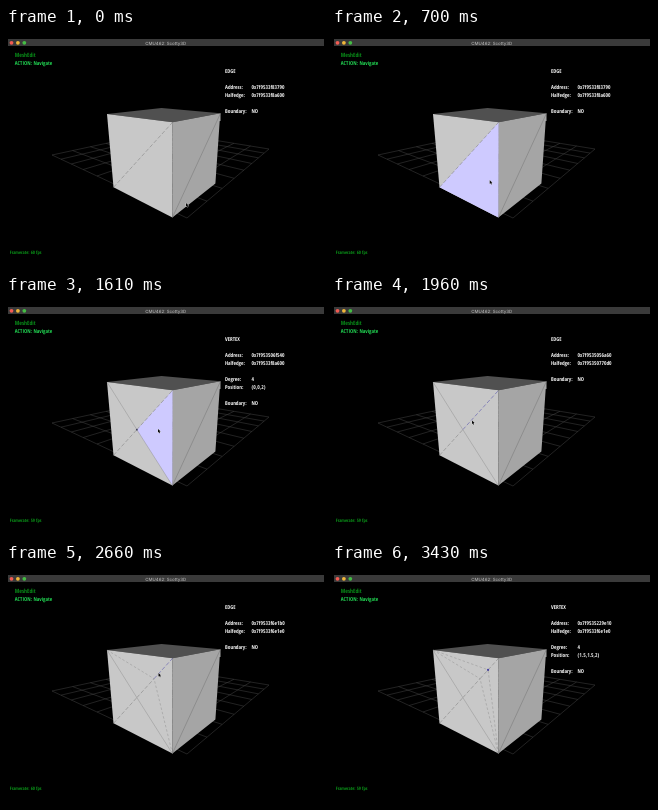
An HTML page with a canvas that plays this animation: 320 by 240 pixels, repeating every 3990 ms.

```html
<!DOCTYPE html>
<html lang="en">
<head>
<meta charset="utf-8">
<title>Mesh editing</title>
<style>
  html, body { margin: 0; width: 100%; height: 100%; overflow: hidden; background: #000; }
  canvas { display: block; }
</style>
</head>
<body>
<canvas id="stage" width="320" height="240"></canvas>
<script>
const ctx = document.getElementById('stage').getContext('2d');
const LOOP = 3990, STEP = 70;
const HUD = '"Open Sans Condensed", "Open Sans", sans-serif';

// Cube corners on screen: A, B, C, D bound the front face.
const A = [101, 86], B = [166.6, 94.3], C = [166.4, 189.6], D = [107.5, 159.3];
const E = [155.5, 80], F = [214.5, 85.3], G = [209.4, 155.5];
const NOTCH = [[214.5, 93], [213.7, 93]];

const mix = (a, b, k) => a + (b - a) * k;
const between = (p, q, k) => [mix(p[0], q[0], k), mix(p[1], q[1], k)];
const splits = [0.395, 0.686, 0.822].map(k => between(D, B, k));
const splitTimes = [1400, 2100, 2800];

// Selected element: start, kind, address, halfedge, position
const selections = [
  [0, 'EDGE', '0x7f9533f83790', '0x7f9533f8a600'],
  [1400, 'VERTEX', '0x7f953506f540', '0x7f9533f8a600', '(0,0,2)'],
  [1960, 'EDGE', '0x7f9535056a60', '0x7f95350770d0'],
  [2100, 'VERTEX', '0x7f953506f8e0', '0x7f95350770d0', '(1,1,2)'],
  [2660, 'EDGE', '0x7f9533f6e1b0', '0x7f9533f6e1e0'],
  [2800, 'VERTEX', '0x7f9535229e10', '0x7f9533f6e1e0', '(1.5,1.5,2)']
];
const rates = [[0, 60], [1050, 59], [2660, 60], [3430, 59]];

// Cursor tip: time, x, y
const route = [
  [0, 180, 175], [490, 180, 175], [560, 179.5, 175.5], [840, 136, 129],
  [1050, 136, 129], [1120, 134, 130.5], [1470, 134, 130.5], [1610, 152, 133],
  [1680, 152, 133], [1960, 140, 124.5], [2030, 140, 124.5], [2310, 157, 122],
  [2520, 152.5, 109], [2730, 152.5, 109], [3010, 161, 124],
  [3290, 156.4, 105.2], [LOOP, 156.4, 105.2]
];
const CURSOR_GONE = 3430;

const latest = (list, t) => list.filter(item => item[0] <= t).pop();

function cursorAt(t) {
  const i = route.findIndex(stop => stop[0] > t);
  const [t0, x0, y0] = route[i - 1], [t1, x1, y1] = route[i];
  const k = (t - t0) / (t1 - t0), eased = k * k * (3 - 2 * k);
  return between([x0, y0], [x1, y1], eased);
}

function distance(p, a, b) {
  const dx = b[0] - a[0], dy = b[1] - a[1];
  const k = ((p[0] - a[0]) * dx + (p[1] - a[1]) * dy) / (dx * dx + dy * dy);
  const q = between(a, b, Math.max(0, Math.min(1, k)));
  return Math.hypot(p[0] - q[0], p[1] - q[1]);
}

function trace(points) {
  ctx.beginPath();
  points.forEach(p => ctx.lineTo(...p));
}

function fill(points, color) {
  trace(points);
  ctx.closePath();
  ctx.fillStyle = color;
  ctx.fill();
}

function line(a, b, color, width = 0.5, dash = []) {
  trace([a, b]);
  ctx.setLineDash(dash);
  ctx.strokeStyle = color;
  ctx.lineWidth = width;
  ctx.stroke();
  ctx.setLineDash([]);
}

function dot(p, r, color) {
  ctx.beginPath();
  ctx.arc(...p, r, 0, 7);
  ctx.fillStyle = color;
  ctx.fill();
}

function text(str, x, y, color, size = 5.4, font = HUD, style = 'bold condensed') {
  ctx.font = `${style} ${size}px ${font}`;
  ctx.fillStyle = color;
  ctx.fillText(str, x, y);
}

// Perspective map from the unit square to a screen quad.
function projector([p0, p1, p2, p3]) {
  const ux = p1[0] - p2[0], uy = p1[1] - p2[1];
  const vx = p3[0] - p2[0], vy = p3[1] - p2[1];
  const sx = p0[0] - p1[0] + p2[0] - p3[0], sy = p0[1] - p1[1] + p2[1] - p3[1];
  const det = ux * vy - vx * uy;
  const g = (sx * vy - vx * sy) / det, h = (ux * sy - sx * uy) / det;
  return (u, v) => [0, 1].map(i =>
    (p0[i] + (p1[i] * (1 + g) - p0[i]) * u + (p3[i] * (1 + h) - p0[i]) * v) / (1 + g * u + h * v));
}
const ground = projector([[46, 127], [155, 103.5], [263, 121], [181, 190]]);

function drawGrid() {
  const n = 8;
  for (let i = 0; i <= n; i++) {
    line(ground(i / n, 0), ground(i / n, 1), '#444');
    line(ground(0, i / n), ground(1, i / n), '#444');
  }
}

function drawCube(t, tip, selected) {
  fill([A, E, F, B], '#505050');
  fill([B, F, ...NOTCH, G, C], '#a5a5a5');
  fill([A, B, C, D], '#c8c8c8');

  const made = splits.filter((p, i) => splitTimes[i] <= t);
  const spine = [D, ...made, B];
  const pairs = made.concat([B]).map((p, i) => [spine[i], p]);
  const vertex = made.find(p => Math.hypot(p[0] - tip[0], p[1] - tip[1]) < 1.5);
  const edge = !vertex && pairs.find(([a, b]) => distance(tip, a, b) < 1.5);

  if (!vertex && !edge) {
    for (const [a, b] of pairs) for (const side of [A, C]) {
      trace([side, a, b]);
      if (ctx.isPointInPath(...tip)) fill([side, a, b], '#cecaff');
    }
  }

  line(C, F, '#747474');
  made.forEach((p, i) => {
    const dash = i ? [2.5, 2] : [];
    for (const side of [A, C]) line(side, p, '#8c8c8c', 0.45, dash);
  });
  for (const pair of pairs) {
    line(...pair, pair === edge ? '#5c58ad' : '#858585', 0.6, [4, 2]);
  }
  if (selected[1] === 'VERTEX') dot(made[made.length - 1], 0.9, '#3c3c55');
  if (vertex) dot(vertex, 1.1, '#4944a8');
}

function drawCursor([x, y]) {
  const shape = [[0, 0], [0, 3.6], [0.9, 2.9], [1.5, 4.2], [2.1, 3.9], [1.5, 2.6], [2.6, 2.5]];
  trace(shape.map(p => [x + p[0], y + p[1]]));
  ctx.closePath();
  ctx.strokeStyle = '#ddd';
  ctx.lineWidth = 0.6;
  ctx.stroke();
  ctx.fillStyle = '#080808';
  ctx.fill();
}

function drawInfo([, kind, address, halfedge, position]) {
  const row = (label, value, y) => {
    text(label, 219, y, '#f4f4f4');
    text(value, 245.5, y, '#f4f4f4');
  };
  text(kind, 219, 45, '#f4f4f4');
  row('Address:', address, 61);
  row('Halfedge:', halfedge, 69);
  if (position) {
    row('Degree:', '4', 84.8);
    row('Position:', position, 92.8);
  }
  row('Boundary:', 'NO', position ? 108.5 : 84.8);
}

function drawWindow(t) {
  ctx.fillStyle = '#3a3a3a';
  ctx.fillRect(2, 11, 316, 7);
  ['#f25b52', '#f0b73a', '#45bd45'].forEach((color, i) => dot([5.5 + i * 6.4, 14.8], 1.9, color));
  ctx.textAlign = 'center';
  text('CMU462: Scotty3D', 159.8, 16.5, '#b4b4b4', 4.4, 'Inter, sans-serif', '500');
  ctx.textAlign = 'left';
  text('MeshEdit', 8.7, 29, '#088a18', 5.8);
  text('ACTION: Navigate', 8.7, 37, '#20d050');
  text(`Framerate: ${latest(rates, t)[1]} fps`, 3.8, 226, '#0a9418', 4.6);
}

function draw(now) {
  const t = Math.floor(now % LOOP / STEP) * STEP;
  const tip = cursorAt(t), selected = latest(selections, t);
  ctx.textRendering = 'geometricPrecision';
  ctx.fillStyle = '#000';
  ctx.fillRect(0, 0, 320, 240);
  drawWindow(t);
  drawGrid();
  drawCube(t, tip, selected);
  drawInfo(selected);
  if (t < CURSOR_GONE) drawCursor(tip);
}

const start = performance.now();
function tick() {
  draw(performance.now() - start);
  requestAnimationFrame(tick);
}
tick();
</script>
</body>
</html>
```
